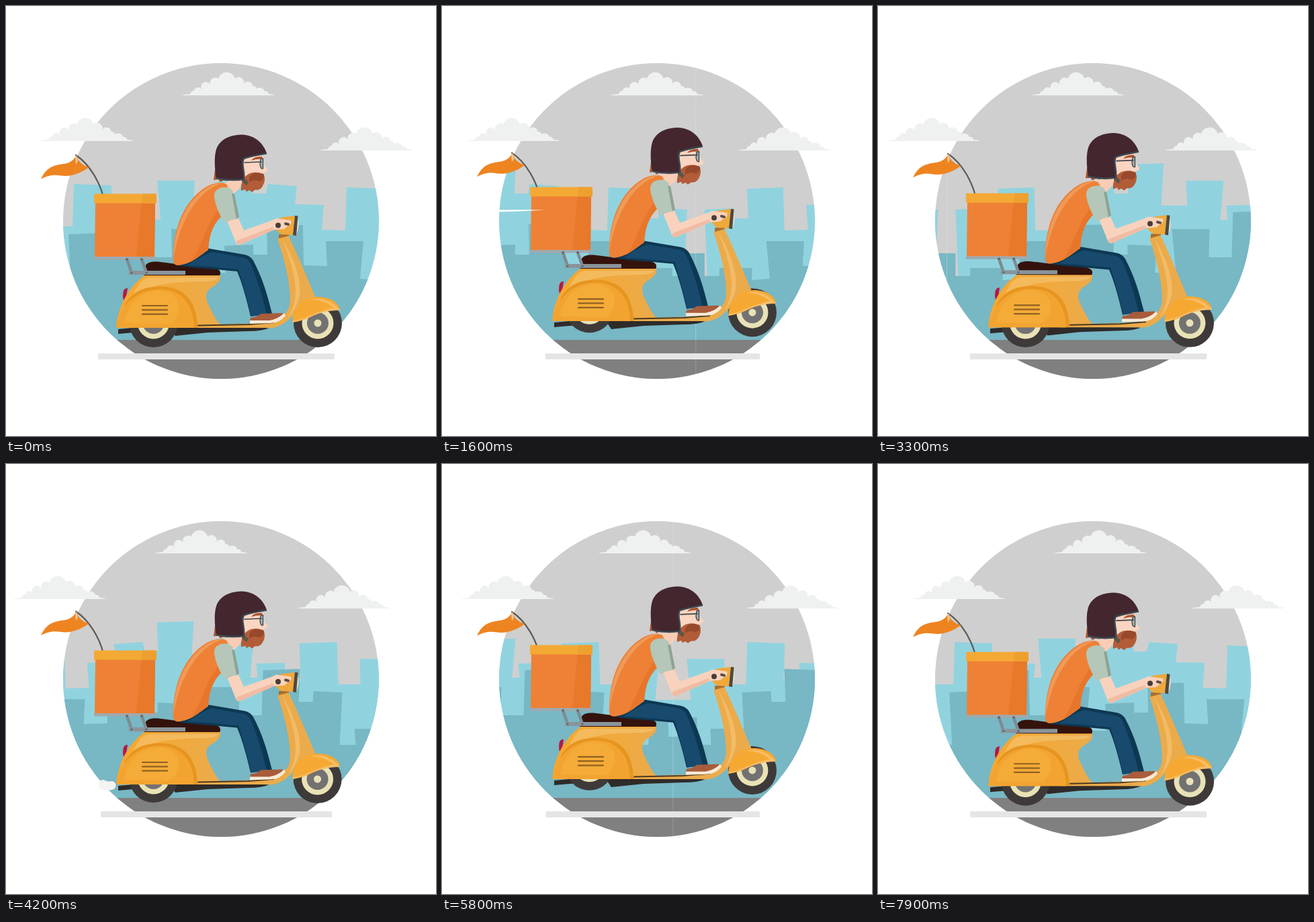
An HTML page for the animation above (8000 ms loop, 640 px wide and 640 px high).

```html
<!DOCTYPE html>
<html lang="en">
<head>
<meta charset="utf-8">
<title>Scooter delivery</title>
<style>
html, body { margin: 0; width: 100%; height: 100%; overflow: hidden; background: #fff; }
svg { display: block; width: 100%; height: 100%; }
.line { fill: none; stroke-linecap: round; stroke-linejoin: round; }
</style>
</head>
<body>
<svg viewBox="0 0 640 640">
  <defs>
    <clipPath id="disc"><circle cx="320" cy="320" r="235"/></clipPath>
    <linearGradient id="paint" gradientUnits="userSpaceOnUse" x1="200" x2="320">
      <stop stop-color="#f5a832"/><stop offset="1" stop-color="#ebab4b"/>
    </linearGradient>
    <g id="block">
      <path fill="#90d3df" d="M-10 498V351H17L11 290H67L66 328H99L101 265L157 267L155 322H180L178 296L221 297L219 318H230L225 260H281L279 297H318L314 234L369 236L367 279H387L390 265L433 268L430 295L473 296L470 333L505 334L507 270L561 272L559 316H581L582 301L624 303L620 405H637V498z"/>
      <path fill="#78b7c4" d="M-10 498V406H-3L-2 377H26L27 418H47L46 394H75L73 418H97L93 340L136 338L137 354H158L156 305L211 307L213 374H247L246 332H302L296 397H327L325 357L368 355V370H389L388 325L442 326L443 386L478 387L476 350H532L527 406L554 408L553 390H602V402H624V368H637V498z"/>
    </g>
    <path id="cloud" fill="#eff1f0" d="M-.5 34Q5 32 12 32A7 7 0 0 1 18 27A6 6 0 0 1 29 25A7 7 0 0 1 42 18A8 8 0 0 1 54 9A13 13 0 0 1 79 9A8 8 0 0 1 92 17A7 7 0 0 1 105 20A6 6 0 0 1 111 24A8 8 0 0 1 123 28A5 5 0 0 1 129 32Q135 32 138.5 34z"/>
    <path id="streak" fill="#fff" d="M0 3Q40-1 133 0Q70 4 0 3z"/>
  </defs>

  <g clip-path="url(#disc)">
    <rect x="80" y="80" width="480" height="480" fill="#cfcfcf"/>
    <g id="city">
      <use href="#block"/>
      <use href="#block" transform="translate(1274) scale(-1 1)"/>
      <use href="#block" transform="translate(1293)"/>
    </g>
    <rect x="80" y="497" width="480" height="60" fill="#808080"/>
    <path id="seams" class="line" stroke="#fff" stroke-width=".7" opacity=".28" d="M637 80V560M1283.5 80V560"/>
  </g>
  <use id="cloudA" href="#cloud"/>
  <use id="cloudB" href="#cloud"/>
  <use id="cloudC" href="#cloud"/>
  <rect id="shadow" y="517" height="9" rx="1.5" fill="#e5e5e5"/>

  <g id="flag">
    <path class="line" stroke="#5d5a55" stroke-width="2.2" d="M147 294C142 264 124 235 104 222"/>
    <path fill="#ee8420" d="M104.5 222C98 236 87 234 75 237C62 240 56 249 52 257.5C65 251 72 251 82 252.5C97 254.5 111 249 123.5 240C113 237 107 231 104.5 222z"/>
    <path fill="#f7c493" d="M105 222L107 231L104 236L103 225z"/>
  </g>

  <g id="smoke" fill="#f3f3f3"></g>

  <g id="under">
    <path fill="#2f2b29" d="M167 481L200 478L392 479Q382 484 360 484L300 486L252 491L246 482L190 486L167 488z"/>
  </g>

  <g id="rear">
    <circle cx="219.5" cy="472" r="36" fill="#3e3a39"/>
    <circle cx="219.5" cy="472" r="23.5" fill="#e9e2b6"/>
    <circle cx="219.5" cy="472" r="16" fill="#727272"/>
  </g>

  <g id="front">
    <circle cx="464" cy="472" r="36" fill="#3e3a39"/>
    <circle cx="464" cy="472" r="23.5" fill="#e9e2b6"/>
    <circle cx="464" cy="472" r="16" fill="#727272"/>
    <circle cx="464" cy="472" r="5.5" fill="#e9e2b6"/>
  </g>

  <g id="body">
    <path fill="#b8183f" d="M181 420Q174 419 174 431Q174 439 178 440z"/>
    <path fill="#34130d" d="M205 401C209 396 206 390 208 386C212 379 224 380 238 382C262 385 280 387 300 388C313 389 320 393 319 398L318 402z"/>
    <path fill="url(#paint)" d="M164 479C166 450 180 420 206 401H319C320 411 312 415 303 421C294 430 299 440 303 448C308 458 312 467 319 474L380 472C405 470 418 460 422 446C426 420 414 376 404 346L420 341C433 368 447 402 462 437L440 448C430 456 420 472 402 478Q396 480 386 479z"/>
    <path fill="#f6c676" d="M203 408Q209 404 216 404H316Q314 409 296 410C250 410 218 414 189 430Q195 416 203 408z" opacity=".6"/>
    <path fill="#f3bb66" d="M411 346C426 372 441 404 437 432Q432 452 420 464Q431 445 431 424C430 395 420 370 411 346z"/>
    <path fill="#e6951f" d="M176 446Q190 420 220 418C264 414 284 438 285 479H270Z"/>
    <path fill="#f3a430" d="M164 479C168 452 188 425 222 422C260 419 279 442 280 479z"/>
    <path fill="#f5ab37" d="M176 472C180 450 192 430 220 424C252 420 268 446 249 469Q246 473 238 473z"/>
    <path class="line" stroke="#8e6123" stroke-width="2.2" stroke-linecap="butt" d="M203 446H240M203 452.3H240M203 458.7H240"/>
    <path class="line" stroke="#4c3920" stroke-width="2" d="M286 475.5L360 474L398 471"/>
    <path fill="#a0a9ad" d="M131 373H223V377.5H131z"/>
    <path class="line" stroke="#7e8b92" stroke-width="4.5" d="M180 377L187 397M202 377L209 397"/>
    <path fill="#89949b" d="M183 394H267V400H183z"/>
    <g fill="#566066">
      <circle cx="180" cy="377" r="1.5"/><circle cx="202" cy="377" r="1.5"/>
      <circle cx="187" cy="397" r="1.5"/><circle cx="209" cy="397" r="1.5"/>
    </g>
    <path fill="#ee8135" d="M133 292H222L221 373H132z"/>
    <path fill="#e8782a" d="M202 292H222L221 373H194z"/>
    <path fill="#f4a935" d="M131 279.5H224V293.5H131z"/>
    <path fill="#eea02f" d="M203 279.5H224V293.5H202z"/>
    <path fill="#a96f2c" d="M406 340L421 339L421 342L406 346z"/>
    <path fill="#efa83b" d="M400 326Q404 314 414 314L430 312L427 341L411 340Q401 336 400 326z"/>
    <path fill="#d9dad5" d="M433 313Q439 326 432 341z"/>
    <path fill="#51483b" d="M430 312L434.5 312.5L432 342L427 341z"/>
    <path fill="#f6a932" d="M426 471C428 446 445 433 464 433C484 433 496 443 497 452C480 453 468 456 455 462Q442 469 426 471z"/>
    <path fill="#f8c376" d="M452 437Q474 431 493 448L497 453C478 453 464 457 450 464L427 471V468C446 467 456 456 488 449Q474 437 452 437z" opacity=".8"/>
  </g>

  <g id="rider">
    <path fill="#a8532f" d="M311 244L342 248L336 263L325 259L319 262L316 258L309 259z"/>
    <path fill="#f9cdb5" d="M323 264Q334 261 338 248L356 250L348 271L334 284z"/>
    <path fill="#fad5c1" d="M350 222L382 220L384 237L389 243Q390 247 384 248L376 258L352 262z"/>
    <path fill="#a8502f" d="M365 230Q368 224 381 224L382 228Q374 227 365 230z"/>
    <path fill="#b25c38" d="M356 254Q364 246 375 248L383 249.5Q387.5 259 382 268Q378 275 371 273.5L366 277L362 274L358 276.5L356 273L350 275Q349 262 356 254z"/>
    <path fill="#97492b" d="M362 255Q367 247 376 248L384 251Q384 259 377 261Q371 257 362 262z"/>
    <path fill="#0d3853" d="M255 386C275 372 290 361 302 361L355 370Q364 372 368 379C382 405 389 430 396 458L364 462C358 436 352 414 344 395L300 391Q275 390 255 386z"/>
    <path fill="#174a6d" d="M270 386Q290 372 306 366L352 374Q360 375 364 383C375 408 382 434 388 458L365 462C359 436 353 414 346 392L302 388z"/>
    <path fill="#a85c3c" d="M364 464Q374 463 379 458L410 457Q414 457 414 460L402 469H363z"/>
    <path fill="#f7ead8" d="M363 468L392 468Q405 466 414 457L416 461Q407 472 394 472L363 473z"/>
    <path fill="#ee8135" d="M249 380C247 342 260 291 300 268C312 262 322 262 328 265L341 290L325 309C310 321 302 338 301 363C288 372 275 385 255 386Q249 385 249 380z"/>
    <path fill="#f09a59" d="M249 375C249 340 264 291 302 269Q313 263 323 263Q302 270 287 287C264 314 255 345 249 375z"/>
    <path fill="#e8762a" d="M317 303L325 309C310 321 302 338 301 363Q286 373 276 380C294 352 298 324 317 303z"/>
    <path fill="#f9d2bd" d="M328 317L345 314L354 334L396 319L402 316L424 319Q427 324 419 328L414 332L399 333L349 355Q344 357 342 352z"/>
    <path fill="#f1bba3" d="M344 349L397 329L399 333L349 355Q345 357 342 352z"/>
    <path fill="#b4c7b8" d="M310 285C309 273 318 269 330 270L337 274L346 316Q335 318 325 323Q312 301 310 285z"/>
    <path fill="#8fa394" d="M336 279H340L347 314L343 317z"/>
    <circle cx="405" cy="326.5" r="4" fill="#493c36"/>
    <path class="line" stroke="#574c44" stroke-width="4" d="M416 324L420 325"/>
  </g>

  <g id="helmet">
    <path fill="#5b5548" d="M351 254L361 262L358 267L351 261z"/>
    <path fill="#9db0b2" stroke="#3d4549" stroke-width="1.3" d="M379 228L382.5 227V242Q379 243 378 236z"/>
    <path class="line" stroke="#3d4549" stroke-width="1.6" d="M355 233L380 232"/>
    <path fill="#43262e" d="M313 257C310 240 309 217 316 207C323 196 337 191.5 351 191.5C370 192 383 204 388 219C375 222 362 223 354 227C349 235 356 245 354 258C340 260 324 259 313 257z"/>
    <path class="line" stroke="#3b4951" stroke-width="2.5" d="M387 219.5C375 222 362 224 354 227C349 235 356 245 354 258C340 260 326 259 314 256.5"/>
  </g>

  <use id="streakA" href="#streak"/>
  <use id="streakB" href="#streak"/>
</svg>

<script>
const $ = id => document.getElementById(id);
const move = (id, x, y) => $(id).setAttribute("transform", `translate(${x} ${y})`);

// One hop lasts four seconds; heights are keyed at these moments.
const HOP = 4;
const keyTimes = [0, .2, 1, 1.65, 2.3, 2.7, 3.2, 3.5, 4];
const keys = {
  body:   [0, -2, -8, -10, -10, -10.5, -2, 1, 0],
  rear:   [0, -4, -17, -22, -21, -18, -2, 2, 0],
  front:  [0, -3, -12, -16, -15, -14, -2, 2, 0],
  rider:  [0, -2.5, -12.5, -11, -8.5, -12, -4, 0, 0],
  helmet: [0, -2, -16, -10, -8, -12, -4, 0, 0],
  flag:   [0, -2.5, -8, -3, 0, -4, -3, 0, 0],
  shadow: [0, 4, 12.8, 17, 16.5, 10.5, .5, 0, 0]
};

// Smooth curve through the keys (cubic Hermite)
function at(values, p) {
  const last = keyTimes.length - 1;
  let i = 0;
  while (i < last - 1 && p >= keyTimes[i + 1]) i++;
  const slope = n => {
    const a = Math.max(n - 1, 0), b = Math.min(n + 1, last);
    return (values[b] - values[a]) / (keyTimes[b] - keyTimes[a]);
  };
  const d = keyTimes[i + 1] - keyTimes[i], u = (p - keyTimes[i]) / d;
  const s = u * u * (3 - 2 * u);
  return values[i] * (1 - s) + values[i + 1] * s
    + d * u * (1 - u) * ((1 - u) * slope(i) - u * slope(i + 1));
}

// Drifts left until `turn`, then back, easing like a sine
function drift(t, turn) {
  const u = t < turn ? t / turn : Math.max(0, (7.92 - t) / (7.92 - turn));
  return -41.3 * Math.sin(u * Math.PI / 2) ** 2;
}

const puffs = Array.from({ length: 9 }, () => {
  const c = document.createElementNS("http://www.w3.org/2000/svg", "circle");
  $("smoke").append(c);
  return c;
});

function smoke(p) {
  const on = p > .05 && p < 1.5;
  puffs.forEach((c, i) => {
    c.setAttribute("cx", 157 - i * (1.8 + (p - .2) * 4.8));
    c.setAttribute("cy", 478.5 - (p - .2) * 10 + 2 * Math.sin(i * 2.4));
    c.setAttribute("r", on ? 5 + p + 1.5 * Math.sin(i * 1.9 + 1) : 0);
    c.setAttribute("opacity", Math.min(1, Math.max(0, (1.5 - p) * 2.4)) * (1 - i * p * .04));
  });
}

function draw(t) {
  const p = t % HOP;
  const y = name => at(keys[name], p);
  move("city", -162 * t, 0);
  move("seams", -162 * t, 0);
  move("cloudA", 262 + drift(t, 4.6), 99);
  move("cloudB", 51.5 + drift(t, 4), 167);
  move("cloudC", 467 + drift(t, 2.72), 181);
  for (const name of ["body", "rear", "rider", "helmet", "flag"]) move(name, 0, y(name));
  move("under", 0, y("body"));
  move("front", y("front") * .13, y("front"));
  const inset = y("shadow");
  $("shadow").setAttribute("x", 137 + inset);
  $("shadow").setAttribute("width", 352 - 1.93 * inset);
  smoke(p);
  move("streakA", 95 - 800 * (p - 1), 233);
  move("streakB", 500 - 800 * (p - 1), 303.5);
}

function tick(now) {
  draw(Math.floor(now % 8000 / 100) / 10);
  requestAnimationFrame(tick);
}
draw(0);
requestAnimationFrame(tick);
</script>
</body>
</html>
```
